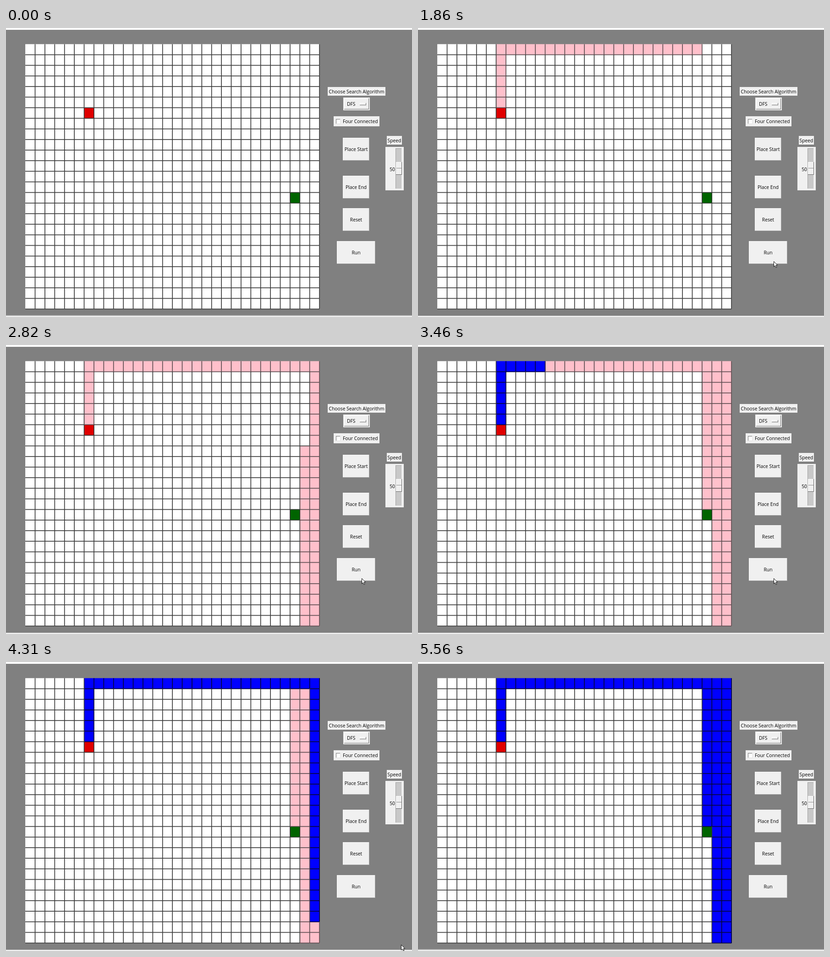
Write an HTML page with a canvas that moves like this. It is 886 by 632 pixels and loops after 5660 ms.

```html
<!DOCTYPE html>
<html lang="en">
<head>
<meta charset="utf-8">
<title>Grid search</title>
<style>
html, body { margin: 0; width: 100%; height: 100%; overflow: hidden; background: #808080; }
canvas { display: block; }
</style>
</head>
<body>
<canvas id="stage" width="886" height="632"></canvas>
<script>
const ctx = document.getElementById('stage').getContext('2d');
const LOOP = 5660;
const COLS = 30, ROWS = 25;
const LEFT = 42.1, TOP = 35.3, CELL_W = 21.4, CELL_H = 23.17, LINE = 1.7;
const FACE = '#f0f0f0';

// fill and edge (right and bottom)
const STYLES = {
  empty: ['#ffffff', '#3c3c3c'],
  seen: ['#ffc0cb', '#5e4e52'],
  path: ['#0000ff', '#06063c'],
  start: ['#e00000', '#3c2c2c'],
  end: ['#006400', '#2c3c2c']
};

// Order in which the depth-first search visits the cells.
const route = [];
function walk(col, row, dCol, dRow, count) {
  for (let i = 0; i < count; i++) route.push([col + dCol * i, row + dRow * i]);
}
walk(6, 5, 0, -1, 6);
walk(7, 0, 1, 0, 23);
walk(29, 1, 0, 1, 24);
walk(28, 24, 0, -1, 24);
walk(27, 1, 0, 1, 13);

// [time, cells coloured]: one pass in pink, then one in blue
const PROGRESS = [
  [1290, 0], [1380, 4.2], [2310, 47.2], [2820, 70.2], [3460, 100.2],
  [4310, 141.2], [4680, 158.2], [5160, 180]
];

// [time, x, y] of the pointer tip
const ENTER = [
  [190, 796, 630], [330, 792, 585], [500, 785, 535], [750, 777, 510],
  [800, 776, 509], [950, 776, 510]
];
const LEAVE = [
  [3700, 776, 510], [4100, 843, 587], [4310, 862, 618], [4680, 860, 620], [4800, 860, 633]
];

function sample(keys, t, field) {
  if (t <= keys[0][0]) return keys[0][field];
  for (let i = 1; i < keys.length; i++) {
    const a = keys[i - 1], b = keys[i];
    if (t < b[0]) return a[field] + (b[field] - a[field]) * (t - a[0]) / (b[0] - a[0]);
  }
  return keys[keys.length - 1][field];
}

function rect(x, y, w, h, color) {
  ctx.fillStyle = color;
  ctx.fillRect(x, y, w, h);
}

function bevel(x, y, w, h, face, light, dark) {
  rect(x, y, w, h, face);
  rect(x, y, w, 1, light);
  rect(x, y, 1, h, light);
  rect(x, y + h - 1, w, 1, dark);
  rect(x + w - 1, y, 1, h, dark);
}

function text(str, x, y, align = 'center') {
  ctx.font = '10.3px "Open Sans", "Noto Sans", sans-serif';
  ctx.textAlign = align;
  ctx.fillStyle = '#000';
  ctx.fillText(str, x, y);
}

function drawGrid(done) {
  const kinds = Array(COLS * ROWS).fill('empty');
  const mark = (col, row, kind) => { kinds[row * COLS + col] = kind; };
  const pathLength = done - route.length;
  route.slice(0, done).forEach(([col, row], i) => mark(col, row, i < pathLength ? 'path' : 'seen'));
  mark(6, 6, 'start');
  mark(27, 14, 'end');

  const eachCell = paint => kinds.forEach((kind, i) => paint(
    LEFT + (i % COLS) * CELL_W, TOP + Math.floor(i / COLS) * CELL_H, ...STYLES[kind]));

  // Fills overlap a little so that no seam shows; the edges go on top.
  eachCell((x, y, fill) => rect(x, y, CELL_W + 0.5, CELL_H + 0.5, fill));
  eachCell((x, y, fill, edge) => {
    rect(x + CELL_W - LINE / 2, y, LINE, CELL_H, edge);
    rect(x, y + CELL_H - LINE / 2, CELL_W, LINE, edge);
  });
}

function button(label, x, y, w, h, baseline) {
  bevel(x, y, w, h, FACE, '#fafafa', '#a6a6a6');
  text(label, 764, baseline);
}

function drawPanel() {
  rect(702, 129, 126, 19, FACE);
  text('Choose Search Algorithm', 765, 143);

  rect(736, 152, 58, 28, FACE);
  bevel(738, 154, 54, 24, FACE, '#fff', '#747474');
  text('DFS', 744, 170, 'left');
  bevel(772, 164, 14, 5, FACE, '#fff', '#747474');

  rect(715, 193, 100, 22, FACE);
  bevel(720, 199, 10, 11, '#fff', '#777', '#e3e3e3');
  text('Four Connected', 735, 208, 'left');

  button('Place Start', 735, 240, 58, 50, 269);
  button('Place End', 735, 323, 58, 50, 352);
  button('Reset', 735, 394, 58, 50, 423);
  button('Run', 722, 466, 84, 50, 495);

  rect(831, 236, 33, 19, FACE);
  text('Speed', 847.5, 249.5);
  rect(828, 260, 40, 95, FACE);
  bevel(850, 263, 14, 89, '#c8c8c8', '#a0a0a0', '#e8e8e8');
  bevel(851, 293, 13, 28, FACE, '#fff', '#696969');
  rect(852, 306, 11, 1, '#8c8c8c');
  text('50', 849, 313, 'right');
}

function drawPointer(x, y) {
  const shape = [[0, 0], [0, 11.5], [2.6, 9.2], [4.6, 13.4], [6.4, 12.6], [4.5, 8.4], [8, 8.2]];
  ctx.beginPath();
  shape.forEach(([dx, dy]) => ctx.lineTo(x + 0.5 + dx, y + 0.5 + dy));
  ctx.closePath();
  ctx.fillStyle = '#fff';
  ctx.fill();
  ctx.lineWidth = 0.9;
  ctx.strokeStyle = '#000';
  ctx.stroke();
}

function draw(t) {
  const focused = t >= 1220 && t < 5560;
  rect(0, 0, 886, 632, '#808080');
  rect(0, 0, 886, 4, '#fdfdfd');
  rect(0, 628, 886, 1, focused ? '#808080' : '#b4b4b4');
  rect(0, 629, 886, 1, '#c4c4c4');
  rect(0, 630, 886, 2, '#f2f2f2');
  drawGrid(Math.floor(sample(PROGRESS, t, 1)));
  drawPanel();
  if (t >= 190 && t < 4800) {
    const keys = t < 3000 ? ENTER : LEAVE;
    drawPointer(Math.round(sample(keys, t, 1)), Math.round(sample(keys, t, 2)));
  }
}

function tick() {
  draw(performance.now() % LOOP);
  requestAnimationFrame(tick);
}
tick();
</script>
</body>
</html>
```
